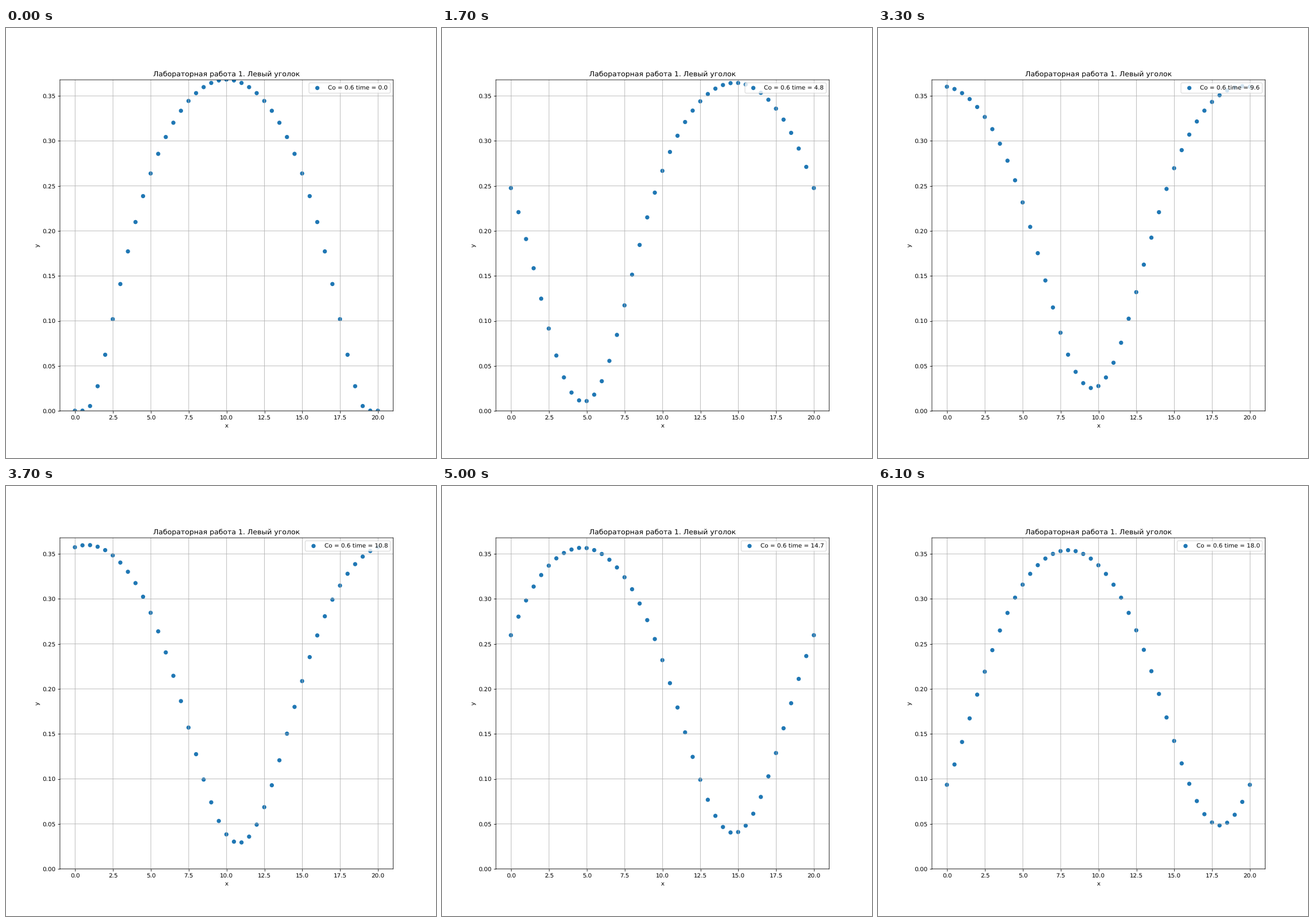
Write a matplotlib script that moves like this. It is 748 px wide and 748 px high and loops after 6200 ms.

```python
import numpy as np
import matplotlib.pyplot as plt
from matplotlib.animation import FuncAnimation
from matplotlib.transforms import offset_copy

INCHES, DPI = 10, 74.8
LENGTH, DX, CO = 20.0, 0.5, 0.6
DT = CO * DX
FRAMES, INTERVAL = 62, 100
NUDGE = 0.0005  # lines sit this share of the figure right of and below the dots

# Unsnapped lines and unhinted glyphs give soft, sub-pixel edges.
plt.rcParams.update({
    "font.family": "DejaVu Sans",
    "path.snap": False,
    "text.hinting": "none",
})


def bump(x):
    """Smooth hump that vanishes at both ends of the interval."""
    s = 1 - (2 * x / LENGTH - 1) ** 2
    y = np.zeros_like(x)
    inside = s > 1e-9
    y[inside] = np.exp(-1 / s[inside])
    return y


def upwind(u):
    """One step of the periodic left-corner scheme."""
    new = u.copy()
    new[1:] -= CO * (u[1:] - u[:-1])
    new[0] = new[-1]
    return new


x = np.linspace(0, LENGTH, int(LENGTH / DX) + 1)
layers = [bump(x)]
for _ in range(FRAMES - 2):
    layers.append(upwind(layers[-1]))


def label(step):
    return f"Co = {CO} time = {step * DT:.1f}"


fig, ax = plt.subplots(figsize=(INCHES, INCHES), dpi=DPI)
fig.subplots_adjust(left=0.125 + NUDGE, right=0.9 + NUDGE,
                    bottom=0.11 - NUDGE, top=0.88 - NUDGE)

# One colour per dot keeps the renderer from rounding dots to whole pixels.
dots = ax.scatter(x, layers[0], color=["C0"] * len(x), label=label(0))
shift = NUDGE * INCHES
dots.set_offset_transform(offset_copy(ax.transData, fig, x=-shift, y=shift))

ax.set_xlim(-1, LENGTH + 1)
ax.set_ylim(0, layers[0].max())
ax.set_title("Лабораторная работа 1. Левый уголок")
ax.set_xlabel("x")
ax.set_ylabel("y")
ax.grid(True)
legend = ax.legend(loc="upper right")
caption = legend.get_texts()[0]


def update(i):
    step = max(0, i - 1)  # the starting layer is held twice as long
    dots.set_offsets(np.column_stack([x, layers[step]]))
    caption.set_text(label(step))
    return dots, caption


anim = FuncAnimation(fig, update, frames=FRAMES, interval=INTERVAL,
                     repeat=True, repeat_delay=0)
plt.show()
```
